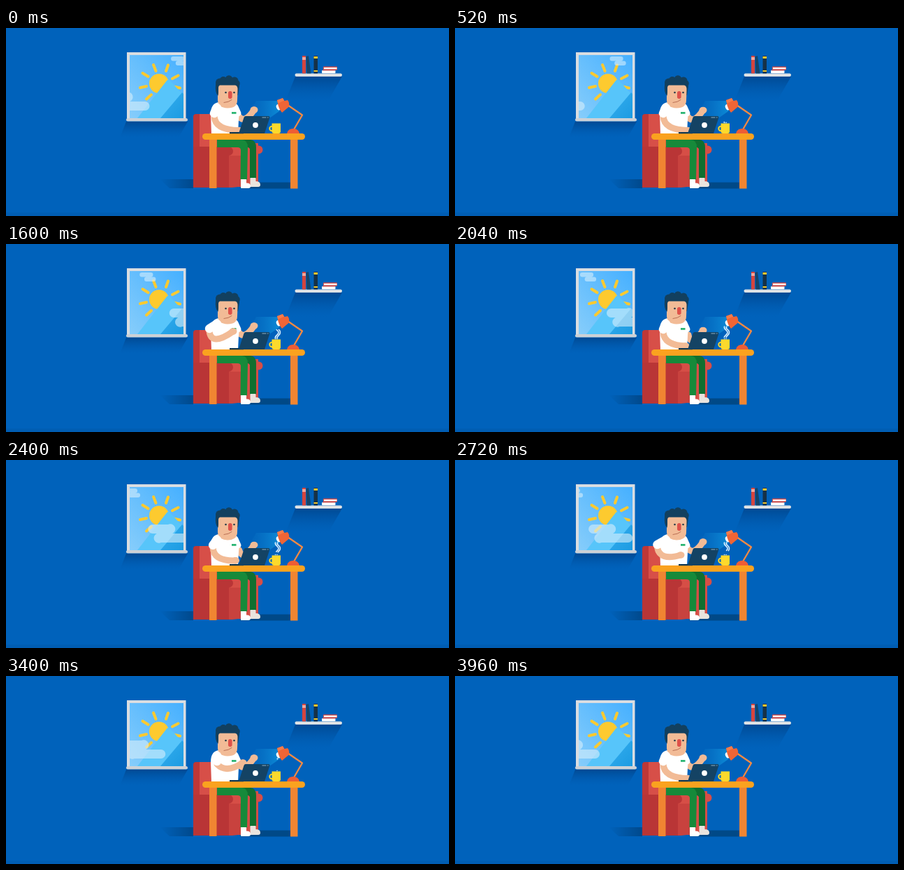
An HTML page that plays this animation: 634 px wide and 271 px high, repeating every 4 s.

```html
<!DOCTYPE html>
<html lang="en">
<head>
<meta charset="utf-8">
<title>Working at the desk</title>
<style>
  html, body { margin: 0; width: 100%; height: 100%; overflow: hidden; background: #0062bb; }
  svg { display: block; width: 100%; height: 100%; }
  .line { fill: none; stroke-linecap: round; stroke-linejoin: round; }
  .skin { stroke: #f2bb96; stroke-width: 9; }
  .steam { stroke: #d9efff; stroke-width: 1.6; }
</style>
</head>
<body>
<svg viewBox="0 0 634 271" preserveAspectRatio="none">
  <defs>
    <linearGradient id="sky" x1="1" y1="0" x2="0" y2="1">
      <stop offset="0" stop-color="#46b0ff"/><stop offset="1" stop-color="#86cdfb"/>
    </linearGradient>
    <linearGradient id="slope" x1="0" y1="0" x2="1" y2="1">
      <stop offset="0" stop-color="#35aeee"/><stop offset="1" stop-color="#1c9be2"/>
    </linearGradient>
    <linearGradient id="fall" x1="0" y1="0" x2="0" y2="1">
      <stop offset="0" stop-color="#00458d" stop-opacity=".85"/><stop offset="1" stop-color="#0059ae" stop-opacity="0"/>
    </linearGradient>
    <linearGradient id="floor">
      <stop offset="0" stop-color="#00498c" stop-opacity="0"/><stop offset="1" stop-color="#00498c"/>
    </linearGradient>
    <linearGradient id="glow">
      <stop offset="0" stop-color="#0b73c6" stop-opacity="0"/><stop offset="1" stop-color="#0c8ad6"/>
    </linearGradient>
    <clipPath id="pane"><rect x="177" y="39" width="77" height="91"/></clipPath>
  </defs>

  <rect width="634" height="271" fill="#0062bb"/>
  <rect y="266" width="634" height="5" fill="#005db3"/>

  <!-- window -->
  <path d="M172 135H260L247 158H163Z" fill="url(#fall)"/>
  <rect x="173" y="35" width="84.5" height="97" fill="#dadde1"/>
  <g clip-path="url(#pane)">
    <rect x="177" y="39" width="77" height="91" fill="url(#sky)"/>
    <circle cx="219" cy="80" r="14" fill="#fdca2f"/>
    <path class="line" stroke="#fdca2f" stroke-width="4" d="M211 53l3.500 9M232 53.500l-3 8.500M238 73l8.500-4.500M240 84.500l9 2M195.500 65l8 5M192 86l9-2M201 102.500l7-6.500"/>
    <path d="M188 130L230 76Q232 73 235 76L254 97V130Z" fill="#57c5fa"/>
    <path d="M221 130L252 93L254 95V130Z" fill="url(#slope)"/>
    <g fill="#d6eefc" fill-opacity=".6">
      <path id="highCloud" d="M3.300 41H16a3.200 3.200 0 0 1 0 6.500H20a3.200 3.200 0 0 1 0 6.500H10a3.200 3.200 0 0 1 0-6.500H3.300a3.200 3.200 0 0 1 0-6.500Z"/>
      <path id="lowCloud" d="M6.500 93H28.500a6.500 6.500 0 0 1 6.500 13H56.500a6.500 6.500 0 0 1 0 13H18.500a6.500 6.500 0 0 1-6-13H6.500a6.500 6.500 0 0 1 0-13Z"/>
    </g>
  </g>
  <rect x="172" y="130" width="88" height="4.600" rx="2.300" fill="#cdd1d6"/>

  <!-- shelf -->
  <path d="M414 70H481L461 105H400Z" fill="url(#fall)"/>
  <rect x="413.500" y="65.500" width="67.500" height="4.500" rx="2.200" fill="#dfe2e5"/>
  <path d="M424 40h5v25.500h-5Z" fill="#d5453f"/>
  <path d="M424 42h5v4h-5Z" fill="#f0a79d"/>
  <path d="M429.500 41l3.500-.8L436.500 65.500H430.500Z" fill="#15456a"/>
  <path d="M440.500 40h5.500v25.500h-5.500Z" fill="#163247"/>
  <path d="M440.500 41h5.500v3h-5.500ZM440.500 61h5.500v2h-5.500Z" fill="#f5c62d"/>
  <rect x="454" y="55.500" width="20" height="5.200" rx="1" fill="#d9534f"/>
  <rect x="455" y="57" width="18.500" height="2.200" fill="#fff"/>
  <rect x="452" y="61" width="19.500" height="4.200" rx="1" fill="#fff"/>
  <path d="M453 61h18" stroke="#d9534f"/>

  <!-- floor shadow and chair -->
  <path d="M220 218H268V231H234Z" fill="url(#floor)"/>
  <path d="M335 222.500H408V231.500H335Z" fill="#004987"/>
  <path d="M300 166H361V226Q361 229 357 229H300Z" fill="#d64e46"/>
  <circle cx="361.500" cy="175.500" r="6" fill="#d64e46"/>
  <path d="M268 128Q268 124 272 124H308V172H268Z" fill="#bd3737"/>
  <path d="M277 124H332V172H277Z" fill="#d74f48" id="chairBack" clip-path="inset(0 25px 0 0)"/>
  <path d="M268 171H318a6.500 6.500 0 0 1 1 13V230H268Z" fill="#b93536"/>
  <path d="M319 184V230Q329 230 336 228V184Z" fill="#c8423e"/>

  <!-- legs -->
  <path d="M338 161H350Q358 162 358 172V217H349V174Q345 170 338 171Z" fill="#106f2f"/>
  <path d="M349.500 216H357.500V221Q364 221 364 226Q364 229 361 229H349.500Z" fill="#e9e4de"/>
  <path id="leg" fill="#168a3a"/>
  <path id="shoe" d="M336 218H344V223.500Q350 223 350 228Q350 231 347 231H336Z" fill="#fff"/>

  <!-- lamp light -->
  <path d="M358 105H391V120L377 130H344Z" fill="url(#glow)"/>

  <!-- body -->
  <g id="farArm"></g>
  <path d="M304 107Q293 109 293 124L294 153H332L333 132L334 120Q332 109 326 107Z" fill="#fff"/>
  <path class="line" stroke="#fff" stroke-width="9" d="M328 114L332 123"/>
  <path d="M323 121h6.500v2.800h-6.500Z" fill="#2bb573"/>
  <g fill="#12405f">
    <circle cx="306" cy="78.500" r="6"/><circle cx="311" cy="75" r="5"/><circle cx="319" cy="73.500" r="5.200"/>
    <circle cx="327" cy="76" r="5.500"/><circle cx="330" cy="80" r="4.800"/>
    <path d="M300 82Q300 76 307 76H328Q334 77 334 84L332 97H303Q299 93 300 82Z"/>
  </g>
  <path d="M306 82.500H328Q332 83 331.500 90L331 104Q331 115.500 317 115.500Q303.500 115 303 104V98Q304 97 304 92V86Q304 83 306 82.500Z" fill="#f2bb96"/>
  <circle cx="314.500" cy="93" r="1.300" fill="#243a4a"/>
  <circle cx="326.500" cy="93" r="1.300" fill="#243a4a"/>
  <rect x="318" y="91" width="5.600" height="11" rx="2.700" fill="#df5149"/>
  <path class="line" d="M312 107.500Q319 107 323 103.500" stroke="#b96f55" stroke-width="1"/>

  <g id="nearArm"></g>

  <!-- desk -->
  <path d="M291 160H301.500V231H291ZM407 160H417.500V231.500H407Z" fill="#f08532"/>
  <rect x="281" y="152" width="147" height="9" rx="4.500" fill="#faa21f"/>
  <path d="M320 150H340V152.300H320Z" fill="#103750"/>
  <path d="M343 127H375.500Q378 127 377.300 129.500L370 152H333L340.500 129Q341 127 343 127Z" fill="#144364"/>
  <circle cx="357" cy="140" r="3.900" fill="#fff"/>
  <path d="M366.500 129h6" stroke="#8fb0c4"/>
  <path d="M374 129h1.500" stroke="#8fb0c4"/>

  <circle cx="380.500" cy="145" r="3.200" fill="none" stroke="#fbd52b" stroke-width="2"/>
  <path d="M380.500 137.500H393V149Q393 152 390 152H383.500Q380.500 152 380.500 149Z" fill="#fcd92c"/>

  <path class="line" d="M403 111L424 125.500L411 148" stroke="#f58a43" stroke-width="2.300"/>
  <path d="M402 152Q403.500 145 411 145Q418.500 145 420 152Z" fill="#ee5d35"/>
  <ellipse cx="390.500" cy="114" rx="3.500" ry="4.500" fill="#fff" transform="rotate(-25 390.500 114)"/>
  <path d="M388 104L396 101L398.500 105L403 104Q406 107 405 113.500L395 122Q390 116 389 109Z" fill="#ef6536"/>
  <path d="M388 104L396 101L398 104.500L389.500 108.500Z" fill="#f47c4b"/>

  <path class="line steam" d="M385.500 136.500C384 132 389 132 390 128S384 124 385.500 119" pathLength="100"/>
  <path class="line steam" d="M388 136.500C387 132 393 132 392.500 127S387 124 388.500 119" pathLength="100"/>
</svg>
<script>
const LOOP = 4000, STEP = 40;
const $ = id => document.getElementById(id);
const mix = (a, b, k) => a + (b - a) * k;

// Each row is [time, ...values]; values ease between rows.
function pose(rows, t) {
  const i = Math.max(1, rows.findIndex(r => r[0] >= t));
  const [a, b] = [rows[i - 1], rows[i]];
  const k = (t - a[0]) / (b[0] - a[0]), ease = k * k * (3 - 2 * k);
  return a.slice(1).map((v, j) => mix(v, b[j + 1], ease));
}

// Arm rows hold the sleeve end, the elbow bend and the hand.
const REST = [298, 127, 299, 147, 333, 147.5];
const TYPE = [298, 127, 299, 146, 330, 147];
const NEAR = [
  [0, ...REST], [500, ...REST], [700, ...TYPE], [1200, ...TYPE],
  [1560, 291, 126, 294, 148, 325, 126], [1680, 291, 126, 294, 148, 325, 126],
  [1960, ...TYPE], [2280, ...TYPE],
  [2680, 289.5, 126, 293, 146, 323, 137], [2800, 289.5, 126, 293, 146, 323, 137],
  [3320, 302, 127, 315, 141, 339, 125], [3480, 302, 127, 315, 141, 339, 125],
  [3880, ...REST], [LOOP, ...REST]
];
const UP = [333, 127, 341, 139, 355, 118];
const DOWN = [334, 131, 337, 150, 355, 124.5];
const FAR = [
  [0, ...UP], [480, ...UP], [720, ...DOWN], [1200, ...DOWN], [1520, ...UP],
  [1680, ...UP], [1960, ...DOWN], [2280, ...DOWN], [2600, ...UP], [LOOP, ...UP]
];
const FOOT = [
  [0, 0], [600, 0], [820, 1], [1000, 1], [1160, 0],
  [2840, 0], [3060, 1], [3200, 1], [3360, 0], [LOOP, 0]
];
const STEAM_HEAD = [[0, 0], [400, 0], [1000, 38], [1600, 75], [2040, 100], [LOOP, 100]];
const STEAM_TAIL = [[0, 0], [1600, 0], [2040, 10], [2720, 35], [3420, 100], [LOOP, 100]];

function drawArm(id, rows, t, shoulder) {
  const [px, py, ex, ey, hx, hy] = pose(rows, t);
  const sleeve = shoulder
    ? `<path class="line" stroke="#fff" stroke-width="12.500" d="M${shoulder}L${px} ${py - 4}"/>` : '';
  $(id).innerHTML =
    `<path class="line skin" d="M${px} ${py}Q${ex} ${ey} ${hx} ${hy}"/>` +
    `<ellipse cx="${hx}" cy="${hy}" rx="5.500" ry="4.800" fill="#f2bb96"/>` + sleeve;
}

function drawLeg(t) {
  const d = 4 * pose(FOOT, t)[0];
  $('leg').setAttribute('d',
    `M302 161H338Q346 162 346 172L${345 + d} 218.500H${335.5 + d}L336 176Q336 172 331 172H302Z`);
  $('shoe').setAttribute('transform', `translate(${d} ${-d / 4})`);
}

function drift(id, start, speed, span, t) {
  let x = start - speed * t / 1000;
  if (x < 110) x += span;
  $(id).setAttribute('transform', `translate(${x} 0)`);
}

const steam = document.querySelectorAll('.steam');
function drawSteam(t) {
  steam.forEach((path, i) => {
    const time = Math.max(0, t - i * 60);
    const head = pose(STEAM_HEAD, time)[0], tail = pose(STEAM_TAIL, time)[0];
    path.style.visibility = head - tail > .5 ? 'visible' : 'hidden';
    path.setAttribute('stroke-dasharray', `0 ${tail} ${Math.max(0, head - tail)} 200`);
  });
}

function render() {
  const t = Math.floor(performance.now() % LOOP / STEP) * STEP;
  drift('highCloud', 236, 28, 112, t);
  drift('lowCloud', 142.5, 38, 152, t);
  drawArm('farArm', FAR, t);
  drawArm('nearArm', NEAR, t, '302 115');
  drawLeg(t);
  drawSteam(t);
  requestAnimationFrame(render);
}
render();
</script>
</body>
</html>
```
